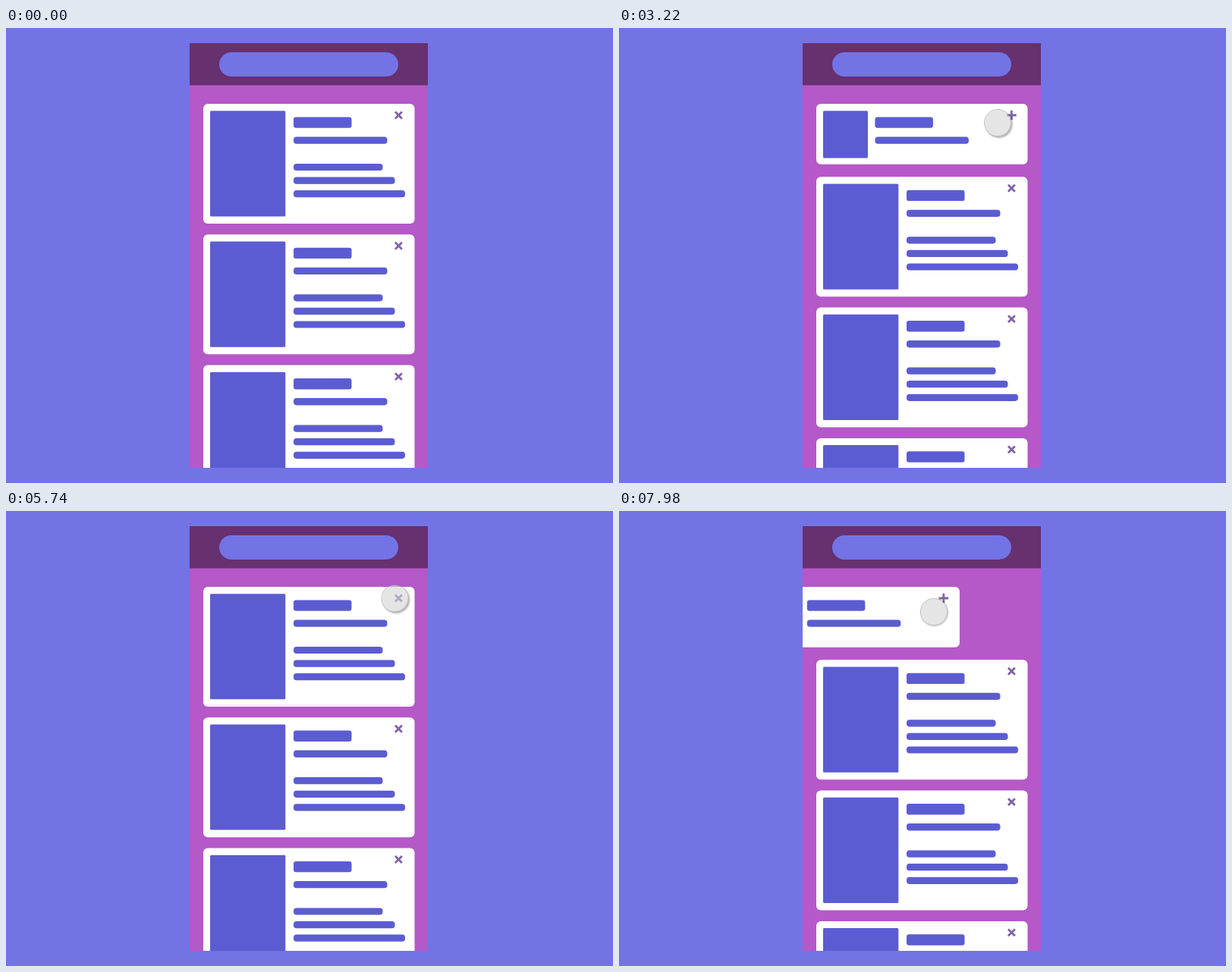
An HTML page that plays this animation: 800 by 600 pixels, repeating every 8000 ms.

```html
<!DOCTYPE html>
<html lang="en">
<head>
<meta charset="utf-8">
<title>Swipeable cards</title>
<style>
  html, body { margin: 0; width: 100%; height: 100%; overflow: hidden; background: #7373e6; }
  svg { display: block; width: 100vw; height: 100vh; }
</style>
</head>
<body>
<svg id="stage" viewBox="0 0 800 600">
  <defs>
    <clipPath id="phone"><rect x="242" y="20" width="314" height="560"/></clipPath>
    <filter id="soft" x="-50%" y="-50%" width="200%" height="200%"><feGaussianBlur stdDeviation="1.3"/></filter>
  </defs>
  <rect width="800" height="600" fill="#7373e6"/>
  <g clip-path="url(#phone)">
    <rect x="242" y="20" width="314" height="560" fill="#b558c8"/>
    <g id="cards"></g>
    <rect x="242" y="20" width="314" height="55.5" fill="#67306f"/>
    <rect x="281" y="32" width="236" height="32" rx="16" fill="#7373e6"/>
    <g id="cursor" opacity=".6">
      <circle id="shadow" r="18" fill="#000" fill-opacity=".5" filter="url(#soft)"/>
      <circle r="17.6" fill="#d5d5d5" stroke="#8c8c8c" stroke-width=".7"/>
    </g>
  </g>
</svg>
<script>
const LOOP = 8000, TOP = 100, PITCH = 172.3, FOLD = 76, SWIPE = -300;
const BAR = '#5c5cd2';

// [start, duration, folded]
const folds = [
  [[1025, 500, 1], [1800, 500, 0], [2665, 500, 1]],
  [[5740, 390, 1], [6290, 500, 0], [7080, 500, 1]]
];
const swipes = [[3390, 700], [7840, 700]];
// [start, duration, x, y]
const cursorMoves = [
  [140, 740, 519, 116],
  [2900, 300, 499, 125],
  [3390, 600, 275, 152],
  [4520, 850, 512.5, 111],
  [5400, 260, 512.5, 115],
  [5900, 350, 511.5, 115],
  [7420, 340, 499, 125],
  [7840, 600, 275, 152]
];

const $ = id => document.getElementById(id);

function make(parent, tag, attrs) {
  const el = document.createElementNS('http://www.w3.org/2000/svg', tag);
  set(el, attrs);
  return parent.appendChild(el);
}

function set(el, attrs) {
  for (const name in attrs) el.setAttribute(name, attrs[name]);
}

const mix = (a, b, p) => a + (b - a) * p;
const bezier = (a, b, s) => 3 * a * s * (1 - s) ** 2 + 3 * b * s * s * (1 - s) + s ** 3;

// Cubic curve (.25, .1, .25, 1)
function ease(x) {
  if (x <= 0) return 0;
  if (x >= 1) return 1;
  let lo = 0, hi = 1;
  for (let i = 0; i < 24; i++) {
    const mid = (lo + hi) / 2;
    if (bezier(.25, .25, mid) < x) lo = mid; else hi = mid;
  }
  return bezier(.1, 1, lo);
}

const ramp = (t, start, duration) => ease((t - start) / duration);

function bar(parent, x, y, width, height, rx) {
  return make(parent, 'rect', { x, y, width, height, rx, fill: BAR });
}

// Card parts are placed relative to the card's top left corner.
function makeCard() {
  const group = make($('cards'), 'g', {});
  const panel = make(group, 'rect', { width: 278.5, height: 158, rx: 6, fill: '#fff' });
  const image = bar(group, 9, 9.2, 99.3, 139.2, 1.5);
  const heading = make(group, 'g', {});
  bar(heading, 119, 17.4, 76.5, 14.4, 3.2);
  bar(heading, 119, 43.4, 123.5, 9.4, 3.8);
  const details = make(group, 'g', {});
  [117.5, 133.5, 147].forEach((w, i) => bar(details, 119, 78.9 + i * 17.6, w, 9.2, 3.8));
  const icon = make(group, 'path', {
    d: 'M-6.3 0H6.3M0 -6.3V6.3', stroke: '#7f64a8', 'stroke-width': 2.8
  });
  return { group, panel, image, heading, details, icon };
}

function drawCard(card, x, y, fold) {
  set(card.group, { transform: `translate(${x} ${y})` });
  set(card.panel, { height: mix(158, 79.8, fold) });
  set(card.image, { width: mix(99.3, 59, fold), height: mix(139.2, 62.2, fold) });
  set(card.heading, { transform: `translate(${-41.6 * fold} 0)` });
  set(card.details, { opacity: 1 - fold });
  set(card.icon, { transform: `translate(257.4 15) rotate(${45 + 45 * fold})` });
}

const cards = Array.from({ length: 5 }, makeCard);

function drawCursor(t) {
  let x = 486, y = -2;
  for (const [start, duration, toX, toY] of cursorMoves) {
    x = mix(x, toX, ramp(t, start, duration));
    y = mix(y, toY, ramp(t, start, duration * 1.17));
  }
  const press = swipes.reduce((sum, [start]) =>
    sum + ramp(t, start, 120) - ramp(t, start + 440, 160), 0);
  const depth = 1 - .65 * press;
  set($('cursor'), { transform: `translate(${x} ${y})` });
  set($('shadow'), { cx: 1.7 * depth, cy: 2 * depth });
}

function draw(t) {
  const slide = ramp(t, 4320, 520);
  const foldOf = folds.map(list =>
    list.reduce((f, [start, duration, to]) => mix(f, to, ramp(t, start, duration)), 0));
  let y = TOP - (PITCH - FOLD) * slide;
  cards.forEach((card, i) => {
    const fold = foldOf[i] || 0;
    const x = 260 + (swipes[i] ? SWIPE * ramp(t, ...swipes[i]) : 0);
    drawCard(card, x, y, fold);
    y += PITCH - FOLD * fold;
  });
  drawCursor(t);
}

const origin = performance.now();
function tick() {
  draw((performance.now() - origin) % LOOP);
  requestAnimationFrame(tick);
}
tick();
</script>
</body>
</html>
```
